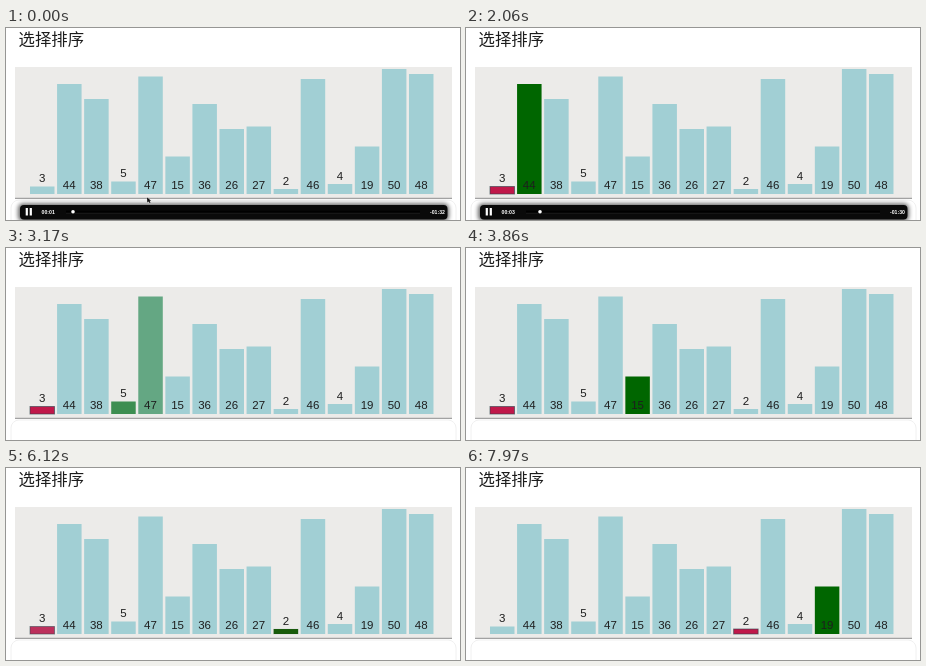
These frames come from a looping animation (454x192 px, 8 s). An HTML page:

```html
<!DOCTYPE html>
<html lang="zh">
<head>
<meta charset="utf-8">
<title>选择排序</title>
<style>
  html, body { margin: 0; width: 100%; height: 100%; overflow: hidden; background: #fff; }
  svg { display: block; width: 454px; height: 192px; }
  .title { font: 16.4px "Noto Sans CJK SC", "Noto Sans CJK", sans-serif; fill: #1c1c1c; }
  .label { font: 11.5px "Liberation Sans", Arial, sans-serif; fill: #1e1e1e; text-anchor: middle; }
  .clock { font: bold 5.2px "Liberation Sans", Arial, sans-serif; fill: #fff; }
</style>
</head>
<body>
<svg viewBox="0 0 454 192">
  <defs>
    <filter id="blur" x="-5%" y="-60%" width="110%" height="220%"><feGaussianBlur stdDeviation="2"/></filter>
  </defs>
  <text class="title" x="12.5" y="17">选择排序</text>
  <rect x="9" y="39" width="437" height="131" fill="#ecebe9"/>
  <g id="bars"></g>
  <rect x="5" y="172" width="445" height="40" rx="8" fill="#fff" stroke="#f0f0f0"/>
  <rect x="9" y="169.8" width="437" height="1" fill="#8c8c8c"/>
  <path id="cursor" d="M141 169.5l.3 5 1.2-1 1.2 1.5 .8-.5-1-1.7h1.7z" fill="#111"/>
  <g id="player">
    <rect x="12" y="175.5" width="431" height="18" rx="5" fill="#000" opacity=".6" filter="url(#blur)"/>
    <rect x="14" y="177" width="427.5" height="14.5" rx="4" fill="#0a0a0a"/>
    <path d="M20.8 180v7.5M24.8 180v7.5" stroke="#fff" stroke-width="2.2"/>
    <path d="M60 183.8H414" stroke="#000" stroke-width="2.4"/>
    <path d="M60 185.2H414" stroke="#2c2c2c" stroke-width=".5"/>
    <circle id="knob" cy="183.8" r="1.8" fill="#fff"/>
    <text id="elapsed" class="clock" x="35.5" y="185.8"></text>
    <text id="left" class="clock" x="424" y="185.8"></text>
  </g>
</svg>
<script>
const LOOP = 8000, STEP = 420, FADE = 160, MIN_AT = 9;
const values = [3, 44, 38, 5, 47, 15, 36, 26, 27, 2, 46, 4, 19, 50, 48];
const TEAL = [161, 207, 212], GREEN = [0, 102, 0], RED = [192, 24, 74];
const $ = id => document.getElementById(id);

function add(tag, attrs, text = '') {
  const el = document.createElementNS('http://www.w3.org/2000/svg', tag);
  for (const name in attrs) el.setAttribute(name, attrs[name]);
  el.textContent = text;
  return $('bars').appendChild(el);
}

const rects = values.map((v, i) => {
  const x = 24 + 27.07 * i, top = 166 - 2.5 * v;
  const rect = add('rect', { x, y: top, width: 24.5, height: 2.5 * v, 'stroke-width': 1 });
  add('text', { class: 'label', x: x + 12.2, y: v > 9 ? 161.3 : top - 4.3 }, v);
  return rect;
});

const clamp = x => Math.max(0, Math.min(1, x));
const ramp = (t, mid) => clamp((t - mid) / FADE + .5);
const during = (t, from, to) => ramp(t, from) - ramp(t, to);
const mix = (a, b, k) => a.map((c, j) => c + (b[j] - c) * k);

// Comparison start; finding the new minimum costs extra steps
const compareAt = i => 1510 + STEP * (i > MIN_AT ? i + 3 : i);
const NEW_MIN = 6180;

function draw(t) {
  rects.forEach((rect, i) => {
    const end = i === MIN_AT ? NEW_MIN : compareAt(i + 1);
    const green = i ? during(t, compareAt(i), end) : 0;
    const red = i === 0 ? during(t, 1130, NEW_MIN) : i === MIN_AT ? ramp(t, NEW_MIN) : 0;
    const fill = mix(mix(TEAL, GREEN, green), RED, red / Math.max(red + green, 1));
    const color = i === 0 ? mix(TEAL, RED, red) : i === MIN_AT && red ? mix(GREEN, RED, red) : fill;
    rect.setAttribute('fill', `rgb(${color})`);
    rect.setAttribute('stroke', `rgba(45,65,75,${red * .6})`);
  });

  const sec = 1 + Math.floor((t + 200) / 1000);
  $('elapsed').textContent = `00:0${sec}`;
  $('left').textContent = `-01:${33 - sec}`;
  $('knob').setAttribute('cx', 67 + t * .0034);
  $('player').setAttribute('opacity', 1 - clamp((t - 2000) / 1000) ** 2);
  $('cursor').setAttribute('opacity', t < 900 ? 1 : 0);
}

function frame(now) {
  draw(now % LOOP);
  requestAnimationFrame(frame);
}
draw(0);
requestAnimationFrame(frame);
</script>
</body>
</html>
```
